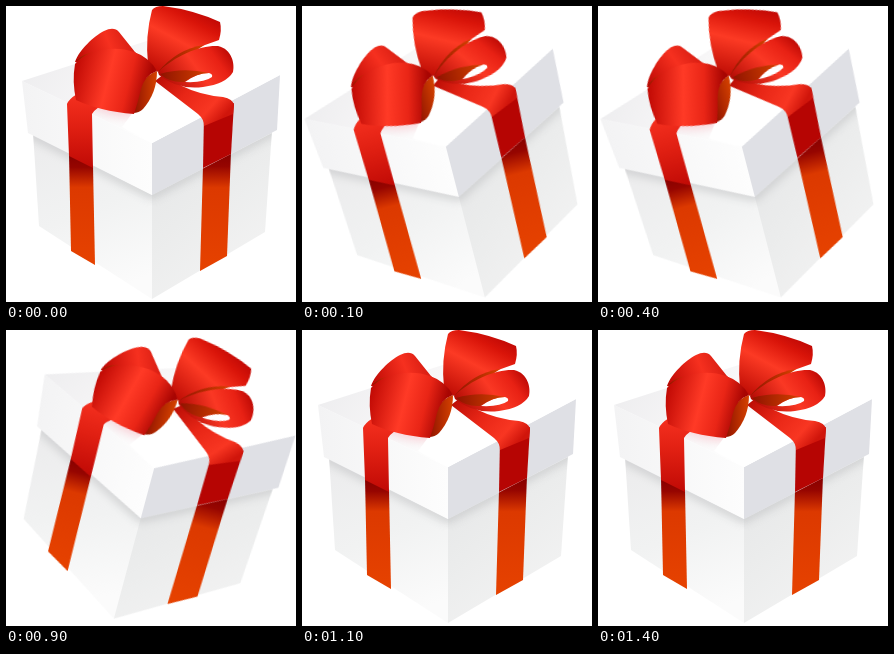
These frames come from a looping animation (290x296 px, 1.6 s). An HTML page:

```html
<!DOCTYPE html>
<html lang="en">
<head>
<meta charset="utf-8">
<title>Rocking gift box</title>
<style>
  html, body { margin: 0; width: 100%; height: 100%; overflow: hidden; background: #fff; }
  svg { display: block; width: 100vw; height: 100vh; }
  #gift { transform-box: view-box; transform-origin: 158.3px 165.3px; }
</style>
</head>
<body>
<svg viewBox="0 0 290 296" preserveAspectRatio="none">
  <defs>
    <linearGradient id="leftSide" x1="0.2" y1="0" x2="0.5" y2="1">
      <stop offset="0" stop-color="#ececed"/><stop offset="0.5" stop-color="#f1f2f2"/><stop offset="1" stop-color="#fbfbfb"/>
    </linearGradient>
    <linearGradient id="rightSide" x1="0" y1="0" x2="0.6" y2="1">
      <stop offset="0" stop-color="#e4e5e6"/><stop offset="0.5" stop-color="#ebecec"/><stop offset="1" stop-color="#f3f3f3"/>
    </linearGradient>
    <linearGradient id="lidTop" x1="0" y1="0" x2="1" y2="0.3">
      <stop offset="0" stop-color="#ebebed"/><stop offset="0.4" stop-color="#f6f5f6"/><stop offset="0.7" stop-color="#fff"/>
    </linearGradient>
    <linearGradient id="lidLeft" x1="0" y1="0" x2="1" y2="0">
      <stop offset="0" stop-color="#f3f3f4"/><stop offset="1" stop-color="#fdfdfd"/>
    </linearGradient>
    <linearGradient id="band" x1="0" y1="0" x2="0" y2="1">
      <stop offset="0" stop-color="#850000"/><stop offset="0.12" stop-color="#960500"/><stop offset="0.3" stop-color="#dc3900"/><stop offset="1" stop-color="#e64200"/>
    </linearGradient>
    <linearGradient id="lidBandLeft" x1="0" y1="0" x2="0" y2="1">
      <stop offset="0" stop-color="#f5301f"/><stop offset="0.45" stop-color="#e01f12"/><stop offset="1" stop-color="#c00a05"/>
    </linearGradient>
    <linearGradient id="tail" x1="0" y1="0" x2="1" y2="0.6">
      <stop offset="0" stop-color="#b50a04"/><stop offset="0.45" stop-color="#e82616"/><stop offset="0.8" stop-color="#f83622"/><stop offset="1" stop-color="#d0150b"/>
    </linearGradient>
    <linearGradient id="crest" x1="0.2" y1="1" x2="0.8" y2="0">
      <stop offset="0" stop-color="#c20f06"/><stop offset="0.45" stop-color="#fc3a24"/><stop offset="0.75" stop-color="#d91409"/><stop offset="1" stop-color="#b40303"/>
    </linearGradient>
    <linearGradient id="backLoop" x1="0" y1="0.6" x2="1" y2="0.4">
      <stop offset="0" stop-color="#c00b06"/><stop offset="0.45" stop-color="#f6301f"/><stop offset="1" stop-color="#b90a05"/>
    </linearGradient>
    <linearGradient id="cheek" x1="0" y1="0.45" x2="1" y2="0.65">
      <stop offset="0" stop-color="#c40c06"/><stop offset="0.4" stop-color="#ff3a26"/><stop offset="0.65" stop-color="#e92516"/><stop offset="0.88" stop-color="#a80502"/>
    </linearGradient>
    <linearGradient id="wing" x1="0" y1="0.7" x2="1" y2="0.3">
      <stop offset="0" stop-color="#b00a04"/><stop offset="0.5" stop-color="#fa3824"/><stop offset="0.8" stop-color="#e82114"/><stop offset="1" stop-color="#be0a05"/>
    </linearGradient>
    <linearGradient id="inner" x1="0" y1="0.5" x2="1" y2="0.5">
      <stop offset="0" stop-color="#8f1200"/><stop offset="1" stop-color="#d54200"/>
    </linearGradient>
    <filter id="soft" x="-30%" y="-50%" width="160%" height="200%"><feGaussianBlur stdDeviation="4"/></filter>
    <clipPath id="topClip"><path d="M16 75L150 32L274 69L146 137Z"/></clipPath>
    <clipPath id="bodyClip"><path d="M27 128L146 189L266 127L259 226L146 293L33 220Z"/></clipPath>
  </defs>

  <g id="gift">
    <!-- body -->
    <path fill="url(#leftSide)" d="M27 126L147 186L146 293L33 220Z"/>
    <path fill="url(#rightSide)" d="M146 186L266 124L259 226L146 293Z"/>
    <g clip-path="url(#bodyClip)">
      <path fill="none" stroke="#b4b5b7" stroke-width="7" opacity=".6" filter="url(#soft)" d="M22 127L146 189L271 124"/>
    </g>
    <path fill="url(#band)" d="M63 148L87 160L89 259L65 245Z"/>
    <path fill="url(#band)" d="M197 160L225 146L221 250L194 265Z"/>

    <!-- lid -->
    <path fill="url(#lidLeft)" d="M16 75L146 137V189L22 127Z"/>
    <path fill="#dfe0e5" d="M146 137L274 69L271 124L146 189Z"/>
    <path fill="url(#lidTop)" d="M16 75L150 32L274 69L146 137Z"/>
    <g clip-path="url(#topClip)">
      <path fill="#f7b3bd" opacity=".5" filter="url(#soft)" d="M74 96Q105 114 130 111L150 78L100 70Z"/>
    </g>
    <path fill="#fff" d="M148 78L196 111L146 137L116 121Z"/>
    <path fill="url(#lidBandLeft)" d="M61 98Q63 93 71 88L101 98Q90 101 86 108L87 162L63 150Z"/>
    <path fill="#b60503" d="M198 109L228 97L225 148L197 162Z"/>
    <path fill="url(#tail)" d="M149 75L158 68L176 80Q194 89 217 91Q227 93 228 99L227 108L198 120Q198 113 192 108Z"/>

    <!-- bow -->
    <path fill="url(#backLoop)" d="M69 56C73 44 88 30 98 25Q108 20 113 26L129 46L150 63L105 62Z"/>
    <path fill="url(#inner)" d="M70 55Q77 47 91 46L81 53Z"/>
    <path fill="url(#crest)" d="M142 58Q139 30 146 4Q149 0 157 0Q188 4 214 16Q216 24 213 34Q183 43 152 66Z"/>
    <path fill="url(#inner)" d="M152 66Q171 43 198 39L177 54Z"/>
    <path fill="url(#wing)" fill-rule="evenodd" d="M152 66C170 49 195 39 212 40C226 43 229 58 227 66Q220 78 197 81Q171 84 153 69ZM179 76Q198 77 206 71Q207 68 203 67Q191 67 179 76Z"/>
    <path fill="url(#inner)" d="M154 68Q177 61 203 67Q191 67 178 76Q164 77 154 68Z"/>
    <path fill="url(#inner)" d="M127 107Q130 72 151 65Q151 87 137 103Q133 107 127 107Z"/>
    <path fill="url(#cheek)" d="M69 58C80 43 110 39 128 46Q143 51 151 65Q139 69 135 83Q132 96 128 108Q93 105 70 94Q66 75 69 58Z"/>
  </g>
</svg>
<script>
  const LOOP = 1600;
  const poses = [
    [0, 0, 0, 0],
    [100, 4.5, -0.5, -14.5],
    [600, -5.5, 3.2, 15],
    [1100, 0, 0, 0],
    [LOOP, 0, 0, 0],
  ];
  const frames = poses.map(([time, x, y, angle]) => ({
    offset: time / LOOP,
    transform: `translate(${x}px, ${y}px) rotate(${angle}deg)`,
    easing: "step-end",
  }));
  document.getElementById("gift").animate(frames, { duration: LOOP, iterations: Infinity });
</script>
</body>
</html>
```
